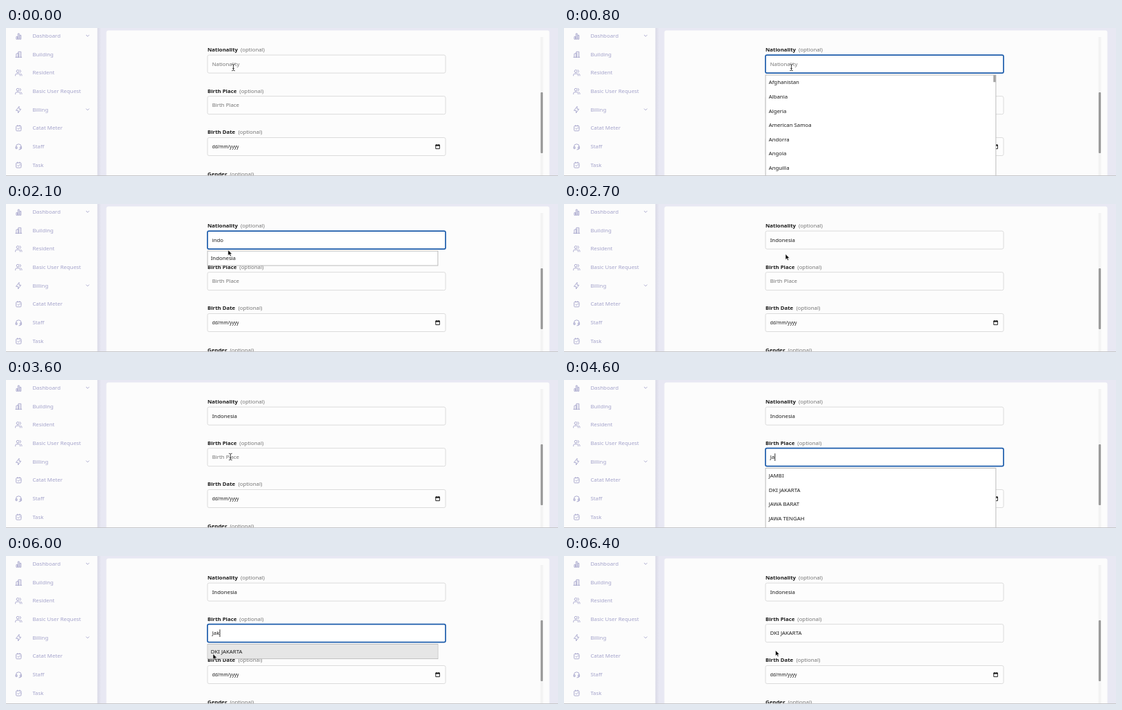
Write an HTML page that moves like this. It is 800 px wide and 214 px high and loops after 7900 ms.

```html
<!DOCTYPE html>
<html lang="en">
<head>
<meta charset="utf-8">
<title>Resident form</title>
<style>
html, body { margin: 0; width: 100%; height: 100%; overflow: hidden; background: #e8e8f3; }
svg { display: block; width: 800px; height: 214px; }
text { font: 7.8px "Noto Sans", sans-serif; fill: #1b1b1b; white-space: pre; }
.nav text { font-size: 7.85px; font-weight: 500; fill: #a4a3cb; }
.icon { fill: none; stroke: #a4a3cb; stroke-width: .9; stroke-linecap: round; stroke-linejoin: round; }
.label { font-weight: 700; }
.hint, .empty { fill: #757575; }
.date { font-size: 6.6px; }
.field { fill: #fdfdfd; stroke: #d9d9d9; stroke-width: .9; }
.focus { fill: #fff; stroke: #1c5cab; stroke-width: 1.7; }
</style>
</head>
<body>
<svg id="stage" viewBox="0 0 800 214" xmlns="http://www.w3.org/2000/svg">
  <defs>
    <linearGradient id="shade">
      <stop offset="0" stop-color="#d8d8e5"/>
      <stop offset="1" stop-color="#e8e8f3"/>
    </linearGradient>
  </defs>
  <rect width="800" height="214" fill="#e8e8f3"/>
  <rect x="132" width="6" height="214" fill="url(#shade)"/>
  <rect width="132.5" height="214" fill="#fcfcfc"/>
  <rect x="145.5" y="3.5" width="642" height="220" rx="3" fill="#fcfcfc"/>
  <rect x="774.5" y="13" width="4" height="201" fill="#f3f3f3"/>
  <rect x="774.8" y="93" width="3.3" height="88" rx="1" fill="#9b9b9b"/>
  <g id="nav" class="nav"></g>
  <g id="form"></g>
  <g id="popup"></g>
  <rect y="213" width="800" height="1" fill="#c6c6c9"/>
  <g id="arrow"><path d="M0 0V8L1.9 6.3L3.2 9.2L4.6 8.6L3.3 5.8H5.8Z" fill="#000" stroke="#fff" stroke-width=".6"/></g>
  <g id="beam" fill="none" stroke-linecap="round">
    <path d="M-2-4.8Q0-4.8 0-3.6Q0-4.8 2-4.8M0-3.6V3.6M-2 4.8Q0 4.8 0 3.6Q0 4.8 2 4.8M-1 1.4H1" stroke="#fff" stroke-width="1.7"/>
    <path d="M-2-4.8Q0-4.8 0-3.6Q0-4.8 2-4.8M0-3.6V3.6M-2 4.8Q0 4.8 0 3.6Q0 4.8 2 4.8M-1 1.4H1" stroke="#222" stroke-width=".8"/>
  </g>
</svg>
<script>
const LOOP = 7900, STEP = 100, ROW = 20.6, LEFT = 292, TEXT_X = 298.7;
const $ = id => document.getElementById(id);

function add(parent, tag, attrs, text) {
  const el = document.createElementNS('http://www.w3.org/2000/svg', tag);
  for (const key in attrs) el.setAttribute(key, attrs[key]);
  if (text !== undefined) el.textContent = text;
  parent.appendChild(el);
  return el;
}
const write = (parent, x, mid, text, cls = '') =>
  add(parent, 'text', { x, y: mid + 2.8, class: cls }, text);

// Sidebar
const users = 'M-1.2-.5A1.9 1.9 0 1 1-1.2-4.3A1.9 1.9 0 1 1-1.2-.5M-4.6 4V3Q-4.6 1.2-2.8 1.2H.4Q2.2 1.2 2.2 3V4M1.8-4.2Q3.2-3.7 3.2-2.4T1.8-.6M3-.1M3.2 1.3Q4.6 1.7 4.6 3V4';
const check = 'M3.6 0V2.8Q3.6 3.8 2.6 3.8H-2.6Q-3.6 3.8-3.6 2.8V-2.4Q-3.6-3.4-2.6-3.4H2.6Q3.6-3.4 3.6-2.4V0M-1.6 .2L-.3 1.5L2-1M-1.6-4.3V-3M1.6-4.3V-3';
const nav = [
  ['Dashboard', 'M-3.4 4.2V1H-1.6V4.2ZM-.9 4.2V-3.6H.9V4.2ZM1.6 4.2V-1.2H3.4V4.2Z'],
  ['Building', 'M-4.4 4H4.4M-3.4 4V-1L-.4-2V4M-.4 4V-4H3.4V4M1.5-2V-1.8M1.5 0V.2M1.5 2V2.2'],
  ['Resident', users],
  ['Basic User Request', users],
  ['Billing', 'M.7-4.5V-1H3.4L-.7 4.5V1H-3.4Z'],
  ['Catat Meter', check],
  ['Staff', 'M-3.8 1.2V0A3.8 3.8 0 0 1 3.8 0V1.2M-3.8 .3H-2.2V2.8H-3.8ZM3.8 .3H2.2V2.8H3.8ZM3.8 2.8Q3.6 4.3 .6 4.3'],
  ['Task', check]
];
nav.forEach(([name, icon], i) => {
  const y = 11.2 + i * 26.67;
  add($('nav'), 'path', { d: icon, class: 'icon', transform: `translate(18.3 ${y + .4})` });
  write($('nav'), 38.4, y, name);
  if (i % 4 === 0) add($('nav'), 'path', { d: `M116.3 ${y - 1}l2 2l2-2`, class: 'icon' });
});

// Form
function makeField(name, mid, hintX) {
  write($('form'), LEFT, mid - 20.8, name, 'label');
  write($('form'), hintX, mid - 20.8, '(optional)', 'hint');
  const box = add($('form'), 'rect', { x: LEFT, y: mid - 12.9, width: 345, height: 26, rx: 2.2, class: 'field' });
  const text = write($('form'), TEXT_X, mid, name, 'empty');
  const caret = add($('form'), 'rect', { y: mid - 5.4, width: .8, height: 10.8, fill: '#000' });
  return { name, mid, box, text, caret };
}
const nation = makeField('Nationality', 52, 340);
const place = makeField('Birth Place', 111.6, 338.3);
const date = makeField('Birth Date', 171.4, 336.4);
date.text.textContent = 'dd/mm/yyyy';
date.text.setAttribute('class', 'date');
date.caret.remove();
add($('form'), 'path', { d: 'M622.8 169.2H628.4V174.6H622.8ZM624 168V169M627.2 168V169', fill: 'none', stroke: '#111', 'stroke-width': .9 });
add($('form'), 'path', { d: 'M622.5 168.8H628.7V170.6H622.5Z', fill: '#111' });
write($('form'), LEFT, 211, 'Gender', 'label');
write($('form'), 324.4, 211, '(optional)', 'hint');

// Suggestions
const countries = ['Afghanistan', 'Albania', 'Algeria', 'American Samoa', 'Andorra', 'Angola', 'Anguilla'];
const withI = [...countries.slice(0, 4), 'Anguilla', 'Antarctica', 'Antigua and Barbuda'];
const withIn = ['Argentina', 'Bahrain', 'Benin', 'Bolivia (Plurinational State of)', 'Bonaire Sint Eustatius Saba',
  'Bosnia and Herzegovina', 'British Indian Ocean Territory (the)'];
const provinces = ['ACEH', 'SUMATERA UTARA', 'SUMATERA BARAT', 'RIAU', 'JAMBI'];
const withJ = ['JAMBI', 'DKI JAKARTA', 'JAWA BARAT', 'JAWA TENGAH', 'JAWA TIMUR'];

// time, focused field, nationality, birth place, suggestions, scroll thumb height
const edits = [
  [0, null, '', ''],
  [300, nation, '', '', countries, 10],
  [1000, nation, 'i', '', withI, 13],
  [1200, nation, 'in', '', withIn, 34],
  [1300, nation, 'ind', '', [withIn[6], 'India', 'Indonesia']],
  [1400, nation, 'indo', '', ['Indonesia']],
  [2700, null, 'Indonesia', ''],
  [3800, place, 'Indonesia', '', provinces, 34],
  [4400, place, 'Indonesia', 'J', withJ],
  [4600, place, 'Indonesia', 'Ja', withJ],
  [4700, place, 'Indonesia', 'Jak', ['DKI JAKARTA']],
  [6400, null, 'Indonesia', 'DKI JAKARTA']
];

// Pointer: time, x, y
const moves = [
  [0, 329.5, 57], [1000, 329.5, 57], [2100, 321.8, 66.5], [2300, 321.4, 71.5], [2500, 321, 72.4],
  [2900, 321, 72.4], [3200, 321.6, 84], [3500, 324.6, 108], [3600, 325.3, 111], [5200, 325.3, 111],
  [5300, 319, 113], [5500, 294, 125.5], [5600, 287.8, 130.5], [5700, 284.8, 135], [5800, 290, 139.5],
  [6000, 300, 141.5], [6400, 306.5, 136.4]
];
const last = (list, t) => list.reduce((hit, item) => item[0] <= t ? item : hit);

function pointer(t) {
  const a = last(moves, t), b = moves[moves.indexOf(a) + 1] || a;
  const k = b === a ? 0 : (t - a[0]) / (b[0] - a[0]);
  const hidden = t >= 1000 && t < 2100 || t >= 4400 && t < 5300;
  return { x: a[1] + (b[1] - a[1]) * k, y: a[2] + (b[2] - a[2]) * k, hidden };
}

function showField(field, value, focused, caretOn) {
  field.box.setAttribute('class', focused ? 'focus' : 'field');
  field.text.textContent = value || field.name;
  field.text.setAttribute('class', value ? '' : 'empty');
  const width = value ? field.text.getComputedTextLength() : 0;
  field.caret.setAttribute('x', TEXT_X + width + .2);
  field.caret.setAttribute('visibility', focused && caretOn ? 'visible' : 'hidden');
}

function showPopup(field, items, thumb, p) {
  const g = $('popup');
  g.replaceChildren();
  if (!items) return;
  const top = field.mid + 16;
  const full = thumb ? 160 : items.length * ROW + .4;
  add(g, 'rect', { x: LEFT + .1, y: top, width: 333.8, height: full, fill: '#fff', stroke: '#b4b4b4', 'stroke-width': .9 });
  items.forEach((item, i) => {
    const y = top + .4 + i * ROW;
    if (!p.hidden && p.x > LEFT && p.y > y && p.y < y + ROW)
      add(g, 'rect', { x: LEFT + .6, y: y + .1, width: 332.8, height: ROW - .6, fill: '#e6e6e6' });
    write(g, 296.7, y + 10.1, item);
  });
  if (thumb) add(g, 'rect', { x: 622.3, y: top + .2, width: 3.4, height: thumb, fill: '#a3a3a3' });
}

function draw(time) {
  const t = Math.floor(time % LOOP / STEP) * STEP;
  const [start, field, country, town, items, thumb] = last(edits, t);
  const caretOn = Math.floor((t - start) / 500) % 2 === 0;
  const p = pointer(t);
  showField(nation, country, field === nation, caretOn);
  showField(place, town, field === place, caretOn);
  showPopup(field, items, thumb, p);
  const inField = [nation, place].some(f => p.x > LEFT && Math.abs(p.y - f.mid) < 13);
  for (const id of ['arrow', 'beam']) {
    const shown = !p.hidden && inField === (id === 'beam');
    $(id).setAttribute('visibility', shown ? 'visible' : 'hidden');
    $(id).setAttribute('transform', `translate(${p.x} ${p.y})`);
  }
}

const begin = performance.now();
function tick() {
  draw(performance.now() - begin);
  requestAnimationFrame(tick);
}
tick();
</script>
</body>
</html>
```
